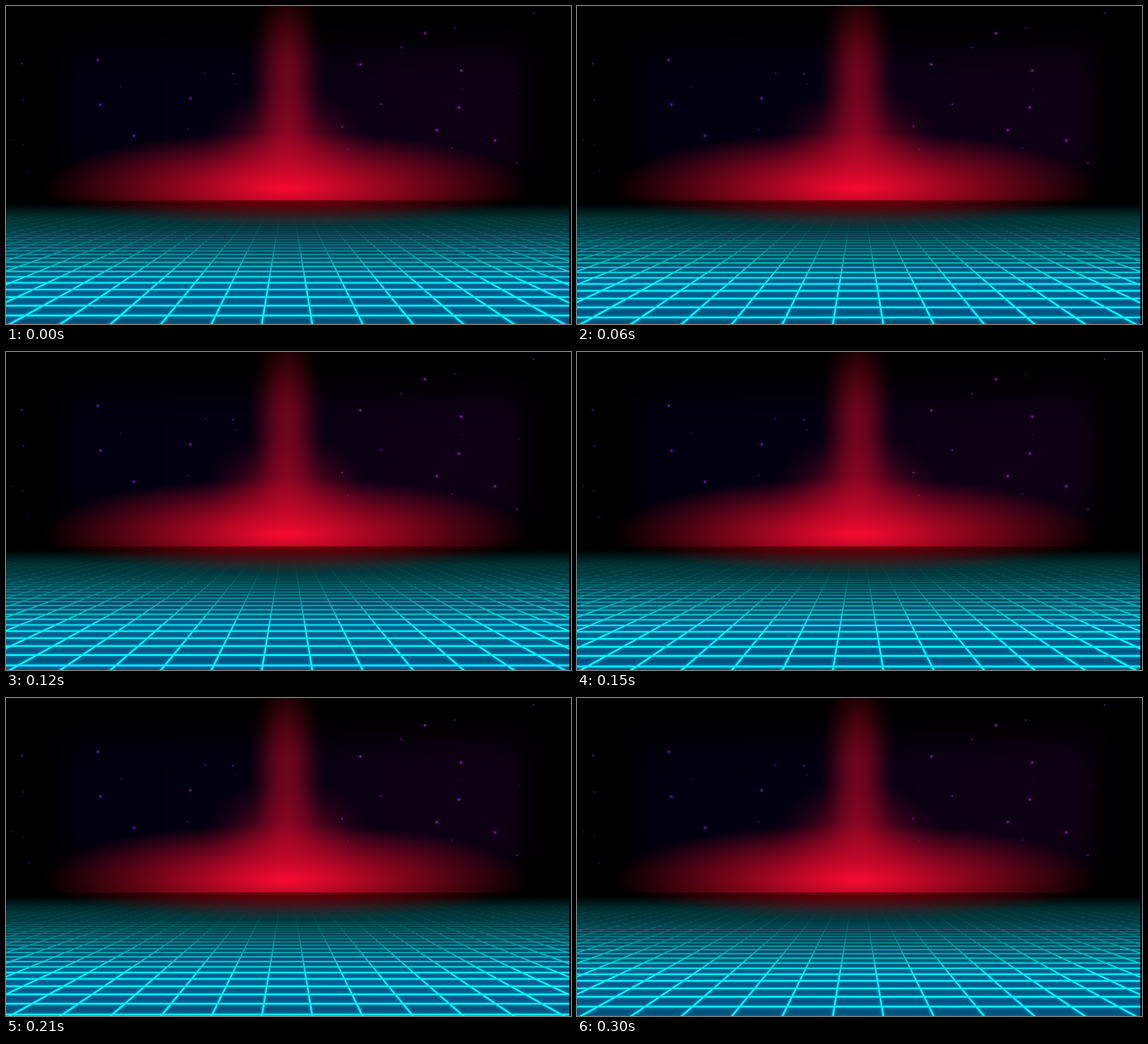
Write an HTML page with a canvas that moves like this. It is 998 px wide and 561 px high and loops after 330 ms.

```html
<!DOCTYPE html>
<html lang="en">
<head>
<meta charset="utf-8">
<title>Neon grid</title>
<style>
html, body { margin: 0; width: 100%; height: 100%; overflow: hidden; background: #000; }
canvas { display: block; }
</style>
</head>
<body>
<canvas id="stage"></canvas>
<script>
const W = 998, H = 561, LOOP = 330, STEPS = 11;
const CENTER = 496.5, HORIZON = 343, FLOOR = 350, FLOOR_RIGHT = 995;
const VANISH = 290, DEPTH = H - VANISH, COLUMN = 89, ROW = 0.000284, FIRST_ROW = 256;
const RED = '255,10,50';

const smooth = r => (1 + Math.cos(Math.PI * r)) / 2;
const cone = r => 1 - r;

function newContext(canvas) {
  canvas.width = W;
  canvas.height = H;
  return canvas.getContext('2d');
}

function gradient(ctx, x0, y0, x1, y1, stops) {
  const g = ctx.createLinearGradient(x0, y0, x1, y1);
  for (const [at, color] of stops) g.addColorStop(at, color);
  return g;
}

function glow(ctx, x, y, rx, ry, rgb, alpha, falloff = smooth) {
  const g = ctx.createRadialGradient(0, 0, 0, 0, 0, 1);
  for (let r = 0; r <= 1; r += 1 / 16) {
    g.addColorStop(r, `rgba(${rgb},${(alpha * falloff(r)).toFixed(4)})`);
  }
  ctx.save();
  ctx.translate(x, y);
  ctx.scale(rx, ry);
  ctx.fillStyle = g;
  ctx.fillRect(-1, -1, 2, 2);
  ctx.restore();
}

function clipped(ctx, x, y, w, h, draw) {
  ctx.save();
  ctx.beginPath();
  ctx.rect(x, y, w, h);
  ctx.clip();
  draw();
  ctx.restore();
}

function star(ctx, x, y, size) {
  const rgb = x < CENTER ? '115,30,225' : '165,30,210';
  glow(ctx, x, y, size * 2.2, size * 2.2, rgb, size * .24);
  glow(ctx, x, y, size, size, rgb, Math.min(1, size * .6));
}

function drawStars(ctx) {
  const bright = [[162, 95], [167, 174], [326, 163], [226, 229], [626, 103],
    [740, 48], [804, 114], [800, 179], [761, 219], [864, 237]];
  for (const [x, y] of bright) star(ctx, x, y, 2.2);

  let seed = 11;
  const random = () => (seed = seed * 16807 % 2147483647) / 2147483647;
  for (let i = 0; i < 24; i++) {
    const side = i % 2 ? 1 : -1;
    star(ctx, CENTER + side * (90 + 395 * random()), 12 + 280 * random(), .6 + 1.2 * random());
  }
}

function makeSky() {
  const ctx = newContext(document.createElement('canvas'));
  ctx.fillStyle = '#000';
  ctx.fillRect(0, 0, W, H);
  ctx.filter = 'blur(28px)';
  ctx.fillStyle = gradient(ctx, 110, 0, 910, 0,
    [[0, '#020010'], [.4, '#030011'], [.65, '#0c0014'], [1, '#100016']]);
  ctx.fillRect(110, 75, 800, 215);
  ctx.filter = 'none';
  drawStars(ctx);
  clipped(ctx, 0, 0, W, HORIZON, () => {
    glow(ctx, 496, 130, 75, 210, RED, .42);
    glow(ctx, 496, 250, 160, 120, RED, .4);
    glow(ctx, 494, 321, 430, 100, RED, .97, cone);
  });
  return ctx.canvas;
}

// Perspective lines, all tapering towards the horizon
function gridPath(phase, width) {
  const path = new Path2D(), far = (FLOOR - VANISH) / DEPTH;
  for (let k = -27; k < 27; k++) {
    const x = (k + .5) * COLUMN;
    const half = width / 2 * Math.hypot(x, DEPTH) / DEPTH;
    path.moveTo(CENTER + (x - half) * far, FLOOR);
    path.lineTo(CENTER + (x + half) * far, FLOOR);
    path.lineTo(CENTER + x + half, H);
    path.lineTo(CENTER + x - half, H);
    path.closePath();
  }
  for (let n = -2; n < 46; n++) {
    const y = 1 / (1 / FIRST_ROW + ROW * (n - phase));
    const thickness = width * y / DEPTH;
    path.rect(0, VANISH + y - thickness / 2, W, thickness);
  }
  return path;
}

const ctx = newContext(document.getElementById('stage'));
const sky = makeSky();
const floorGradient = stops => gradient(ctx, 0, FLOOR, 0, H, stops);
const floorFill = floorGradient([[0, '#000'], [.12, '#00282b'], [.45, '#00445a'],
  [.65, '#005682'], [1, '#004a74']]);
const lineFill = floorGradient([[0, 'rgba(0,140,135,0)'], [.24, 'rgba(0,155,150,.35)'],
  [.45, 'rgba(0,200,200,.75)'], [.65, '#0ff']]);
const haloFill = floorGradient([[.2, 'rgba(0,170,200,0)'], [.65, 'rgb(0,185,235)']]);

function drawFloor(phase) {
  clipped(ctx, 0, FLOOR, FLOOR_RIGHT, H - FLOOR, () => {
    ctx.fillStyle = floorFill;
    ctx.fillRect(0, FLOOR, W, H - FLOOR);
    ctx.fillStyle = haloFill;
    for (let width = 20; width > 4; width *= .7) {
      ctx.globalAlpha = 1.1 / width;
      ctx.fill(gridPath(phase, width));
    }
    ctx.globalAlpha = 1;
    ctx.fillStyle = lineFill;
    ctx.fill(gridPath(phase, 3));
  });
  clipped(ctx, 0, HORIZON, W, 60, () => glow(ctx, 494, 321, 430, 72, '175,0,18', .9, cone));
}

function frame(now) {
  const phase = Math.floor(now % LOOP / LOOP * STEPS) / STEPS;
  ctx.drawImage(sky, 0, 0);
  drawFloor(phase);
  requestAnimationFrame(frame);
}
requestAnimationFrame(frame);
</script>
</body>
</html>
```
